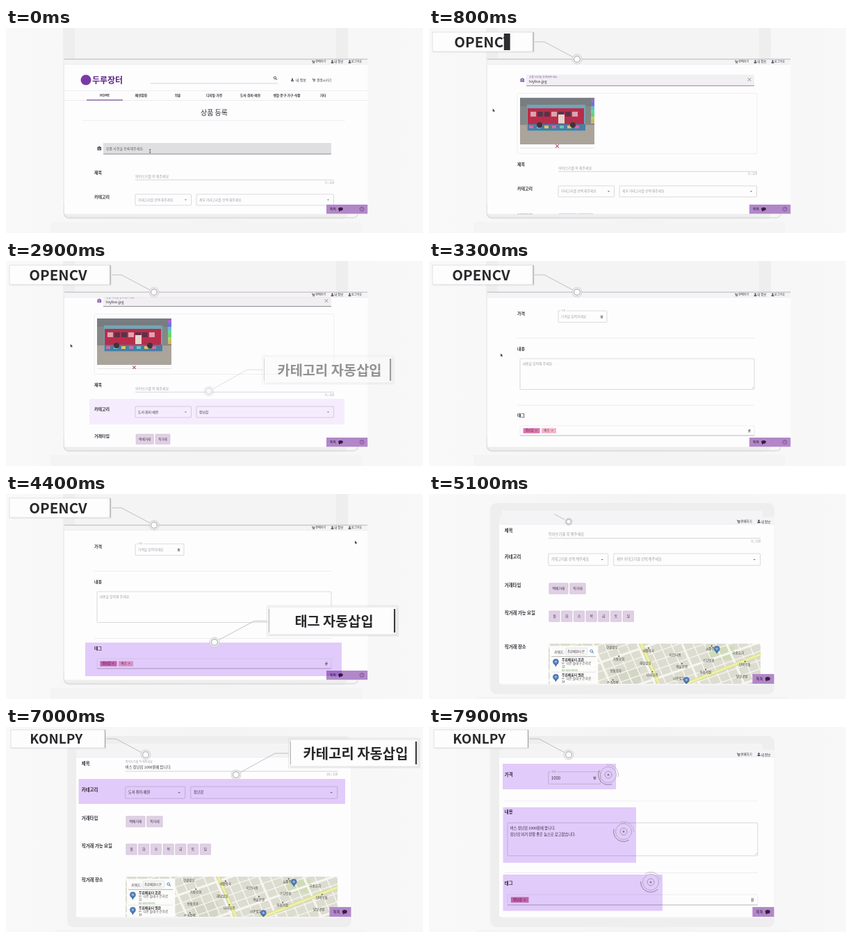
An HTML page with a canvas that plays this animation: 600 px wide and 296 px high, repeating every 8000 ms.

```html
<!DOCTYPE html>
<html lang="ko">
<head>
<meta charset="utf-8">
<style>
html, body { margin: 0; width: 600px; height: 296px; overflow: hidden; background: #f6f6f7; }
canvas { display: block; width: 600px; height: 296px; }
</style>
</head>
<body>
<canvas id="stage" width="600" height="296"></canvas>
<script>
const c = document.getElementById('stage').getContext('2d');
const LOOP = 8000, ZOOM = 1.068;
const FONT = '"Noto Sans CJK KR", "Noto Sans CJK", "Noto Sans", sans-serif';
const INK = '#36333a', HINT = '#a09ea4', LINE = '#c4c2c7', LILAC = '#e2cdfb';
const TITLE = '버스 장난감 1000원에 팝니다.';

const clamp = v => Math.max(0, Math.min(1, v));
const lin = (t, a, b) => clamp((t - a) / (b - a));
const ease = (t, a, b) => { const p = lin(t, a, b); return p * p * (3 - 2 * p); };
const mix = (a, b, p) => a + (b - a) * p;

function rect(x, y, w, h, color) { c.fillStyle = color; c.fillRect(x, y, w, h); }

function frame(x, y, w, h, color = LINE, r = 1, width = .6) {
  c.beginPath(); c.roundRect(x, y, w, h, r);
  c.strokeStyle = color; c.lineWidth = width; c.stroke();
}

function path(points, color = LINE, width = .7, closed) {
  c.beginPath();
  points.forEach(([x, y], i) => i ? c.lineTo(x, y) : c.moveTo(x, y));
  if (closed) { c.closePath(); c.fillStyle = color; c.fill(); return; }
  c.strokeStyle = color; c.lineWidth = width; c.stroke();
}

const hline = (x, x2, y, color, width) => path([[x, y], [x2, y]], color, width);

function disc(x, y, r, fill, stroke, width = 1, a = 0, b = 7) {
  c.beginPath(); c.arc(x, y, r, a, Math.min(b, a + Math.PI * 2));
  if (fill) { c.fillStyle = fill; c.fill(); }
  if (stroke) { c.strokeStyle = stroke; c.lineWidth = width; c.stroke(); }
}

function text(s, x, y, size = 4.95, color = INK, weight = 400, align = 'left') {
  c.font = `${weight} ${size}px ${FONT}`;
  c.fillStyle = color; c.textAlign = align; c.textBaseline = 'middle';
  c.fillText(s, x, y);
}

function clipped(x, y, w, h, draw) {
  c.save(); c.beginPath(); c.rect(x, y, w, h); c.clip(); draw(); c.restore();
}

function faded(alpha, draw) {
  if (alpha <= 0) return;
  c.save(); c.globalAlpha *= alpha; draw(); c.restore();
}

function person(x, y) {
  disc(x, y - 1.1, 1.1, INK);
  rect(x - 1.8, y + .5, 3.6, 1.5, INK);
}

function cart(x, y) {
  path([[x - 2.2, y - 1.8], [x - 1.5, y - 1.8], [x - .7, y + .8], [x + 1.3, y + .8], [x + 1.8, y - 1], [x - 1, y - 1]], INK, .7);
  disc(x - .4, y + 2, .5, INK); disc(x + 1.1, y + 2, .5, INK);
}

function lens(x, y, color = INK) {
  disc(x, y, 1.7, null, color, .8);
  path([[x + 1.2, y + 1.2], [x + 3, y + 3]], color, .9);
}

function select(x, w, y, value, hint) {
  frame(x, y, w, 16);
  text(value || hint, x + 4, y + 7.8, 4.8, value ? INK : HINT);
  const ax = x + w - 8;
  path([[ax - 1.6, y + 7.4], [ax + 1.6, y + 7.4], [ax, y + 9]], '#777', 1, true);
}

function chip(label, x, y, w) {
  rect(x, y, w, 14.5, '#dfd0e4');
  frame(x, y, w, 14.5, '#cbb6d2', .5, .5);
  text(label, x + w / 2, y + 7, 4.6, '#493a54', 400, 'center');
}

const label = (s, y) => text(s, 127, y, 6, INK, 600);

function siteHeader(dy) {
  c.save(); c.translate(0, dy);
  disc(115, 75, 7.5, '#7a3aa5');
  text('두루장터', 124, 75, 12, '#5b2587', 800);
  hline(208, 391, 80, LINE); lens(387, 72);
  person(412, 75); text('내 정보', 417, 75, 5);
  cart(443, 75); text('갱생시키기', 447, 75, 4.6);
  hline(84, 520, 90.5, '#e9e8eb');
  [['HOME', 142], ['패션잡화', 194.5], ['의류', 247], ['디지털·가전', 299.5], ['도서·취미·애완', 351.5],
   ['생활·문구·가구·식품', 404], ['기타', 456]].forEach(([s, x]) => text(s, x, 97.5, 4.7, INK, 600, 'center'));
  hline(84, 520, 104.5, '#e5e3e8');
  hline(116, 168, 104, '#5b2587', 1.2);
  text('상품 등록', 299.5, 122, 10, INK, 500, 'center');
  hline(110, 488, 133.5, '#ebe9ed');
  c.restore();
}

function busPhoto(x, y) {
  rect(x, y, 107, 67, '#858886');
  rect(x, y, 107, 12, '#777d80');
  rect(x, y + 39, 107, 28, '#aaa49b');
  rect(x + 10, y + 10, 84, 38, '#71a6b5');
  rect(x + 11, y + 15, 81, 27, '#b92d4c');
  rect(x + 11, y + 38, 83, 9, '#477fa3');
  for (let i = 0; i < 7; i++) {
    rect(x + 15 + i * 10, y + 20, 8, 7, i % 3 ? '#573448' : '#dca4ac');
    rect(x + 13 + i * 11, y + 40, 6, 4, ['#d26ca2', '#65c7c3', '#e4c25c'][i % 3]);
  }
  rect(x + 55, y + 24, 9, 13, '#e5d5ce');
  [28, 76].forEach(d => disc(x + d, y + 39, 4, '#42333c'));
  for (let i = 0; i < 7; i++) rect(x + 102, y + 2 + i * 5, 5, 5, `hsl(${270 - i * 38} 55% 62%)`);
}

function upload(y, hasPhoto) {
  const icon = hasPhoto ? '#7141a0' : INK;
  rect(131.5, y - 2, 5.5, 4.5, icon);
  rect(133, y - 3, 2.5, 1, icon);
  disc(134.2, y + .2, 1.4, null, '#fff', .7);
  rect(140, y - 8, 328, 16, hasPhoto ? '#f1eff2' : '#dfdee0');
  hline(140, 468, y + 8, '#858188', .9);
  if (!hasPhoto) return text('상품 사진을 등록해주세요.', 144, y, 5, '#66636a');
  text('상품 사진을 등록해주세요.', 144, y - 4.5, 3.8, '#8757ae');
  text('toybus.jpg', 144, y + 2, 5.2);
  text('×', 461, y - 1, 8, '#777', 400, 'center');
  frame(127, y + 19, 345, 87, '#e4e2e7', 2);
  busPhoto(131, y + 25.5);
  hline(131, 238, y + 98, '#ddd');
  text('×', 184.5, y + 96, 8, '#a52444', 600, 'center');
}

function pin(x, y) {
  path([[x - 3, y], [x + 3, y], [x, y + 6]], '#446da8', 1, true);
  disc(x, y - 1, 3.7, '#5681bd', '#365d98', .6);
  disc(x, y - 1, 1.3, '#a8c3e7');
}

function cityMap(x, y) {
  clipped(x, y, 286, 92, () => {
    rect(x, y, 286, 92, '#dcdcd0');
    rect(x + 90, y + 34, 34, 58, '#d3d6c6');
    rect(x + 216, y + 4, 34, 18, '#cfdbb9');
    for (let i = -3; i < 24; i++) {
      path([[x + i * 15, y], [x + i * 15 + 40, y + 92]], '#f7f6f0', i % 4 ? 1.4 : 3);
      path([[x, y + i * 12 + 50], [x + 286, y + i * 12 - 50]], '#f7f6f0', i % 4 ? 1.2 : 3);
    }
    const roads = [[[x + 123, y - 4], [x + 166, y + 92]], [[x + 130, y + 76], [x + 290, y + 13]]];
    roads.forEach(r => path(r, '#c9cc91', 4.6));
    roads.forEach(r => path(r, '#eef0a4', 3.6));
    ['한솔빌딩', '새봄약국', '미르타워', '늘품주택', '다솜교회', '가람공원', '해담빌딩', '여울은행', '소담병원', '단비학원',
     '보람상가', '나래회관', '라온빌딩', '아침서점', '달빛공방', '은솔주택', '참빛빌딩', '푸름식당'].forEach((s, i) => {
      const lx = x + 78 + i % 5 * 42 + (i * 7) % 13, ly = y + 5 + Math.floor(i / 5) * 16 + i % 5 * 5 % 13;
      text(s, lx, ly, 4.2, '#403f3e', 500);
      if (i % 2) disc(lx + 8, ly - 4, .9, '#4b4a48');
    });
    pin(x + 227, y + 8); pin(x + 186, y + 50);
    rect(x + 2, y + 3, 65, 90, 'rgba(255,255,255,.88)');
    text('키워드 :', x + 8, y + 11, 4.6);
    frame(x + 24, y + 6, 28, 9, '#ccc', 0, .5);
    text('푸른배움터 본', x + 25.5, y + 10.5, 4.1);
    lens(x + 58, y + 10, '#2d73af');
    hline(x + 4, x + 64, y + 17.5, '#999');
    ['푸른배움터 본관', '푸른배움터 별관', '푸른배움터 신관'].forEach((s, i) => {
      const py = y + 21.5 + i * 20.5;
      pin(x + 10, py + 4);
      text(s, x + 18, py, 4.5, INK, 600);
      text('다온 솔내구 은하로', x + 24, py + 5, 4.3, '#555');
      rect(x + 18, py + 4, 3.5, 2, '#c7b5c4');
      text(['12', '34', '56'][i], x + 18, py + 10, 4, '#555');
      text('00-000-0000', x + 18, py + 14.5, 3.8, '#62a34b');
      hline(x + 4, x + 64, py + 17, '#ddd');
    });
  });
}

function mainForm(y, s) {
  label('제목', y);
  const typed = TITLE.slice(0, s.typed);
  if (typed || s.focus) text('띄어쓰기를 꼭 해주세요', 186, y - 2, 3.8, s.focus ? '#8050a8' : HINT);
  text(typed || (s.focus ? '' : '띄어쓰기를 꼭 해주세요'), 186, y + 4.8, 5, typed ? INK : HINT);
  if (s.focus) {
    c.font = `400 5px ${FONT}`;
    rect(186.5 + c.measureText(typed).width, y + 2, .6, 5.5, INK);
  }
  hline(186, 472, y + 10.3, s.focus ? '#a587c0' : LINE, .7);
  text(`${s.typed} / 120`, 472, y + 14, 4.2, HINT, 400, 'right');

  label('카테고리', y + 34.8);
  select(186, 80.5, y + 31, s.sorted && '도서·취미·애완', '카테고리를 선택 해주세요');
  select(274, 197.5, y + 31, s.sorted && '장난감', '세부 카테고리를 선택 해주세요');

  label('거래타입', y + 74);
  chip('택배거래', 187, y + 71, 25.5); chip('직거래', 215, y + 71, 21);
  label('직거래 가능 요일', y + 111.5);
  [...'월화수목금토일'].forEach((d, i) => chip(d, 187 + i * 16.6, y + 108.5, 14.3));
  label('직거래 장소', y + 156.5);
  cityMap(186, y + 152.7);
}

function tag(s, x, y, w, color) {
  rect(x, y, w, 7.5, color);
  text(s + '  ×', x + w / 2, y + 3.6, 4.2, '#5c2145', 500, 'center');
}

function detailForm(y, s) {
  label('가격', y);
  frame(186, y - 4, 70, 16.5);
  rect(189, y - 5, 8.5, 2, '#fefdfe');
  text('가격', 190, y - 4, 3.4, HINT);
  text(s.filled ? '1000' : '가격을 입력하세요', 190, y + 4.5, s.filled ? 5.5 : 4.8, s.filled ? INK : HINT);
  text('₩', 248.5, y + 4.5, 6.5, '#555', 500, 'center');
  hline(127, 468, y + 35.5, '#e8e6ea');
  label('내용', y + 50.5);
  frame(131, y + 65, 337, 44.5);
  if (s.filled) {
    text(TITLE, 134.5, y + 72.5);
    text('장난감 이거 정말 좋은 놈으로 갖고왔습니다.', 134.5, y + 80.7);
  } else text('내용을 입력해 주세요.', 134.5, y + 72, 4.9, HINT);
  path([[465, y + 108], [467, y + 106]], '#888', .5);
  hline(127, 468, y + 132.5, '#e8e6ea');
  label('태그', y + 147);
  frame(131, y + 162, 337, 14, '#e2e0e5');
  hline(131, 468, y + 176, '#aaa7ad');
  text('#', 461, y + 169, 8, '#555', 400, 'center');
  tag('장난감', 135.5, y + 165.3, 24, '#dc78ae');
  if (!s.filled) tag('버스', 162, y + 165.3, 21, '#f2b5cb');
}

function page(s) {
  rect(84, 40, 437, 232, '#fefdfe');
  if (s.top > -200) { siteHeader(s.top); upload(174 + s.top, s.photo); }
  mainForm(s.y, s);
  detailForm(s.y + 270, s);
  rect(84, 40, 437, 12.5, '#f4f3f5');
  hline(84, 520, 52.5, '#e4e2e6', .5);
  cart(442.3, 48.8); text('판매하기', 445.2, 48.8, 4.1, INK, 500);
  person(469.5, 48.8); text('내 정보', 472.2, 48.8, 4.4, INK, 500);
  person(494.5, 48.8); text('로그아웃', 497, 48.8, 4.1, INK, 500);
  rect(461, 255, 59.5, 13.5, '#b287c9');
  text('톡톡', 466, 261.5, 5, '#342041', 500);
  c.beginPath(); c.ellipse(481.5, 261.3, 3.3, 2.4, 0, 0, 7); c.fillStyle = '#342041'; c.fill();
  path([[479, 262.5], [482, 263.5], [479, 265]], '#342041', 1, true);
  disc(512, 261.5, 2.8, null, '#503363', .6);
  text('?', 512, 261.4, 4.2, '#503363', 400, 'center');
}

// Pale laptop behind the page; x, y, w, h is its lid
function laptop(x, y, w, h) {
  const g = c.createLinearGradient(0, 0, 600, 0);
  g.addColorStop(0, '#f9f9fa'); g.addColorStop(.5, '#f4f4f5'); g.addColorStop(1, '#f8f8f9');
  rect(0, 0, 600, 296, g);
  c.beginPath(); c.roundRect(x, y, w, h, 9);
  c.fillStyle = '#eeeeef'; c.fill();
  rect(x + 17, y + 11, w - 34, h - 24, '#f4f4f5');
  rect(x - 18, y + h + 4, w + 38, 296, '#f4f4f5');
}

function shade(t, a, b, x, y, w, h) {
  const p = ease(t, a, a + 200);
  faded(p * (1 - lin(t, b, b + 150)), () => {
    c.globalCompositeOperation = 'multiply';
    rect(x, y, w * p, h, LILAC);
  });
}

function ring(x, y, p) {
  disc(x, y, 7 * p, 'rgba(240,240,241,.85)', '#cacacd', .8);
  disc(x, y, 4.4 * p, '#fdfdfd', '#b4b4b8', 1.2);
}

// Marker ring, then leader line, then the box with its wiped-in caption
function callout(t, start, end, caption, size, box, dot, elbow, left) {
  const [x, y, w, h] = box, d = t - start;
  if (d < 0) return;
  faded(1 - lin(t, end, end + 200), () => {
    const edge = left ? x + w + 2 : x - 2, cy = elbow[1];
    const leg = lin(d, 50, 180), tail = lin(d, 180, 260), grow = ease(d, 220, 560);
    const dx = elbow[0] - dot[0], dy = cy - dot[1], len = Math.hypot(dx, dy);
    const from = [dot[0] + dx / len * 7, dot[1] + dy / len * 7];
    if (leg) path([from, [mix(from[0], elbow[0], leg), mix(from[1], cy, leg)]], '#b0b0b3', .8);
    if (tail) path([elbow, [mix(elbow[0], edge, tail), cy]], '#b0b0b3', .8);
    ring(...dot, ease(d, 0, 150));
    if (!grow) return;
    const bw = w * grow, bx = left ? x + w - bw : x;
    rect(bx + 1, y + 1, bw + 1, h + 1, 'rgba(0,0,0,.04)');
    rect(bx, y, bw, h, '#fdfdfd');
    frame(bx, y, bw, h, '#d4d4d7', 0, .7);
    if (left) rect(bx + bw - .5, y, 1, h, '#9a9a9e');
    else {
      frame(bx - 2.5, y - 2, bw + 5, h + 4, '#dcdcdf', 0, .7);
      rect(bx, y + 3, .8, h - 6, '#a5a5a9');
      rect(bx + bw - 4, y + 3, 2.2, h - 6, '#3c3c40');
    }
    c.font = `700 ${size}px ${FONT}`;
    const tw = c.measureText(caption).width;
    const x0 = x + w / 2 - tw / 2 + (left ? -2.5 : 2);
    const head = ease(d, 380, 620), cut = ease(d, 440, 830);
    clipped(x, y, bw, h, () => {
      clipped(x0 - 2, y, (tw + 4) * cut, h, () =>
        text(caption, x0 + 15 * (1 - ease(d, 500, 850)), y + h / 2 + (left ? 0 : .7), size, '#29292c', 700));
      const a = x0 + tw * cut, b = x0 + tw * head;
      if (b > a) rect(a, y + 2, b - a, h - 4, '#2d2d30');
    });
  });
}

function pointer(x, y) {
  path([[x, y], [x, y + 4.5], [x + 1.2, y + 3.5], [x + 2, y + 5], [x + 2.8, y + 4.6], [x + 2, y + 3.1], [x + 3.4, y + 3]], '#444', 1, true);
}

function target(t, start, x, y) {
  const p = ease(t, start, start + 180), spin = (t - start) / 250;
  faded(p, () => {
    disc(x, y, 11.5 * p, null, '#aa9eb5', .8);
    disc(x, y, 5 * p, null, '#a094ab', .9);
    disc(x, y, 1.5 * p, '#897d95');
    disc(x, y, 14.5 * p, null, '#8d8298', 1, spin, spin + 2.4);
    disc(x, y, 14.5 * p, null, '#b6abc0', .8, spin + 3.3, spin + 5.3);
  });
}

function sceneOne(t) {
  laptop(82, -14, 410, 290);
  frame(84, 250, 422, 24, '#dcdce0', 6, 1.4);
  const photo = t >= 400;
  const shift = -116.5 * ease(t, 500, 900) - 373 * ease(t, 2950, 3250);
  clipped(84, 45, 436.5, 223.5, () =>
    page({ top: shift, y: 209 + (photo ? 86.5 : 0) + shift, photo, typed: 0, sorted: t >= 1350 }));
  hline(84, 520, 45, '#b5b4b7', 1);
  shade(t, 1150, 2800, 120, 199, 367, 37);
  shade(t, 3700, 4650, 114, 214.5, 369, 48.5);
  if (t < 300) {
    path([[206, 175.5], [208.4, 175.5]], INK, .6);
    path([[207.2, 175.5], [207.2, 180]], INK, .6);
    path([[206, 180], [208.4, 180]], INK, .6);
  } else {
    const a = ease(t, 300, 850), b = ease(t, 2800, 3100), d = ease(t, 3700, 4200);
    pointer(mix(mix(mix(207, 89, a), 103, b), 502, d), mix(mix(mix(178, 115, a), 133.5, b), 67.5, d));
  }
  callout(t, 50, 4700, 'OPENCV', 20.5, [5, 6, 145, 28], [213, 45], [166, 20], true);
  callout(t, 1330, 2800, '카테고리 자동삽입', 19.8, [371, 138, 185, 38], [292, 188], [347, 157]);
  callout(t, 3550, 4600, '태그 자동삽입', 19.7, [378, 163, 184, 40], [300, 214], [357, 183.5]);
}

function sceneTwo(t) {
  laptop(88, 13, 409, 276);
  clipped(101, 33, 395.5, 241, () => {
    c.translate(-26.9, -12.4); c.scale(ZOOM, ZOOM);
    page({
      top: -400, y: mix(61.2, -193.8, ease(t, 7350, 7600)),
      typed: Math.min(TITLE.length, Math.floor(clamp((t - 5250) / 5000) * 100)),
      focus: t >= 5200 && t < 6400, sorted: t >= 6600, filled: true
    });
  });
  shade(t, 6400, 7250, 104.5, 75, 383.5, 36);
  shade(t, 7550, 9000, 106, 53, 163, 37);
  shade(t, 7600, 9000, 106.5, 116, 191.5, 80);
  shade(t, 7650, 9000, 106.5, 213, 229.5, 52.5);
  target(t, 7600, 258, 69);
  target(t, 7650, 280, 151);
  target(t, 7700, 319, 224);
  callout(t, 5000, 9000, 'KONLPY', 19, [7, 4, 135.5, 26], [201, 40], [158, 17], true);
  callout(t, 6150, 7230, '카테고리 자동삽입', 19.9, [409, 18, 184, 39], [331, 69], [387, 38]);
}

function draw(now) {
  const t = now % LOOP, fade = ease(t, 4800, 5100);
  c.setTransform(1, 0, 0, 1, 0, 0);
  c.globalAlpha = 1;
  if (fade < 1) sceneOne(t);
  faded(fade, () => sceneTwo(t));
  requestAnimationFrame(now => draw(Math.max(0, now - origin)));
}

const origin = performance.now();
draw(0);
</script>
</body>
</html>
```
